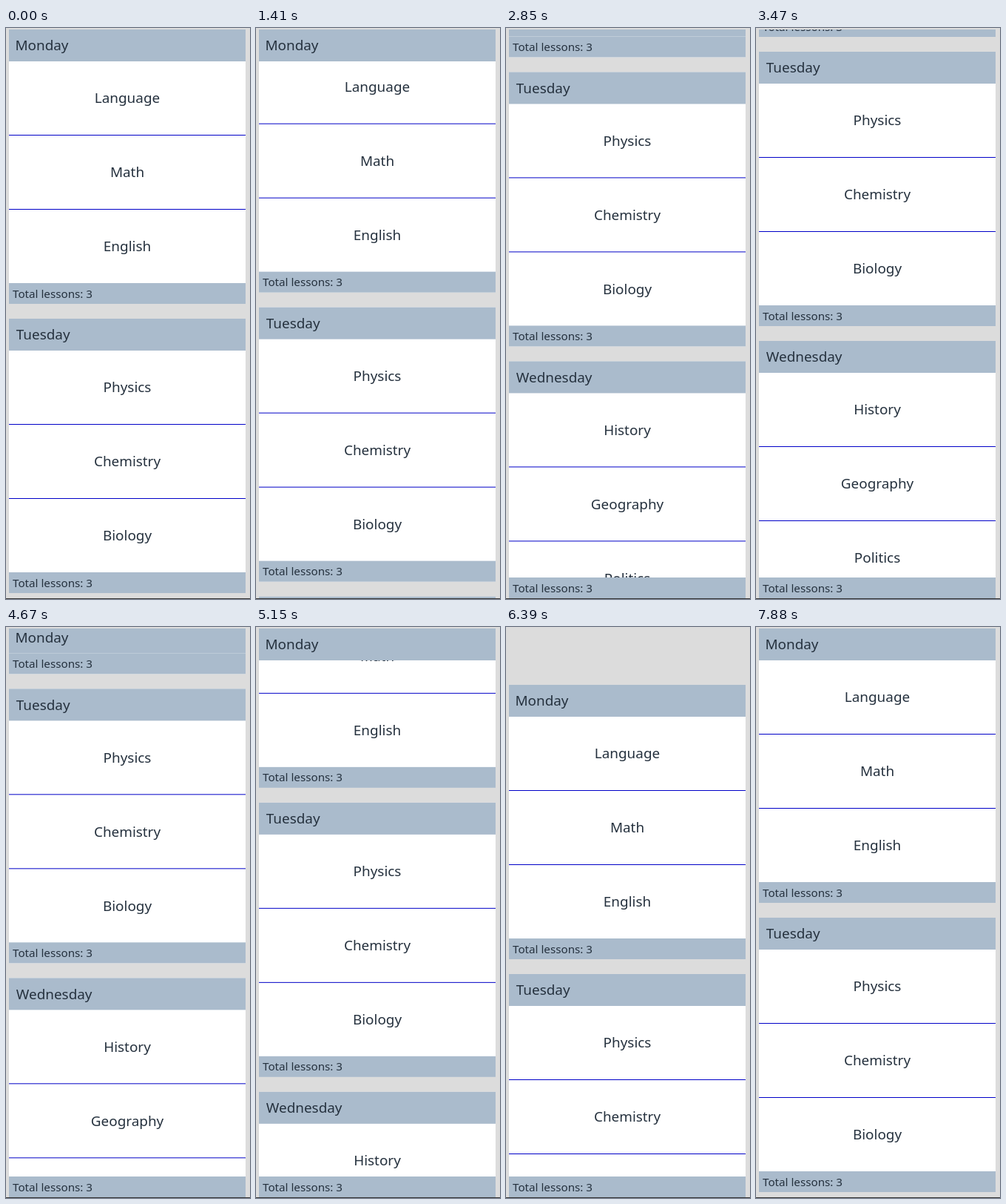
Recreate the animation shown at these times as an HTML page with a canvas. Size 330x770 px, loop 9.35 s.

```html
<!DOCTYPE html>
<html lang="en">
<head>
<meta charset="utf-8">
<title>Timetable</title>
<style>
  html, body { margin: 0; width: 100%; height: 100%; overflow: hidden; background: #dcdcdc; }
  canvas { display: block; }
</style>
</head>
<body>
<canvas id="stage" width="330" height="770"></canvas>
<script>
const ctx = document.getElementById('stage').getContext('2d');
const LOOP = 9350;
const LEFT = 4, WIDTH = 320, TOP = 2, BOTTOM = 769;
const HEADER = 43, ROW = 100, FOOTER = 28, HEIGHT = 370, PITCH = 390;
const BAR = '#aabbcc', INK = '#25313e';

const days = [
  ['Monday', 'Language', 'Math', 'English'],
  ['Tuesday', 'Physics', 'Chemistry', 'Biology'],
  ['Wednesday', 'History', 'Geography', 'Politics']
];

// Scroll keys: time (ms), offset (px), speed (px/ms)
const keys = [
  [0, 0, 0], [1255, 0, 0],
  [2090, 229.6, .24], [2850, 332.5, .075], [3200, 354, .04], [3470, 360, 0],
  [4315, 360, 0], [4670, 308.9, -.24], [5640, 32.6, -.1], [5760, 31, -.02],
  [6180, -63, -.12], [6390, -76, 0]
];
const RELEASE = 7315, REST = 7880, STIFFNESS = .015;

function scrollAt(t) {
  if (t >= REST) return 0;
  if (t >= RELEASE) {
    // Critically damped spring back from the overscroll
    const x = STIFFNESS * (t - RELEASE);
    return -76 * (1 + x) * Math.exp(-x);
  }
  const i = keys.findIndex(k => k[0] > t);
  if (i < 0) return -76;
  const [t0, y0, v0] = keys[i - 1], [t1, y1, v1] = keys[i];
  const d = t1 - t0, u = (t - t0) / d, w = 1 - u;
  return w * w * ((1 + 2 * u) * y0 + u * d * v0) + u * u * ((1 + 2 * w) * y1 - w * d * v1);
}

function box(color, y, h) {
  ctx.fillStyle = color;
  ctx.fillRect(LEFT, y, WIDTH, h);
}

function label(text, x, y, size, align = 'left') {
  ctx.font = `${size}px "Noto Sans", "Open Sans", sans-serif`;
  ctx.textAlign = align;
  ctx.fillStyle = INK;
  ctx.fillText(text, x, y);
}

function drawDay([name, ...lessons], top) {
  if (top > BOTTOM || top + HEIGHT < TOP) return;
  box('#fff', top, HEIGHT);
  lessons.forEach((lesson, i) => {
    label(lesson, 164, top + 99.3 + i * ROW, 18.9, 'center');
    if (i) box('#0000c8', top + 42 + i * ROW, 1);
  });

  // Bars stick to the viewport edges but stay inside their section
  const end = top + HEIGHT - FOOTER;
  const footerY = Math.max(Math.min(end, BOTTOM - FOOTER), top + HEADER);
  const headerY = Math.min(Math.max(top, TOP), end - HEADER);
  box(BAR, footerY, FOOTER);
  label('Total lessons: ' + lessons.length, 9, footerY + 19.5, 15.2);
  box(BAR, headerY, HEADER);
  label(name, name[0] === 'M' ? 12.4 : 13.8, headerY + 28.4, 18.9);
}

function draw(t) {
  const scroll = scrollAt(t);
  ctx.fillStyle = '#dcdcdc';
  ctx.fillRect(0, 0, 330, 770);
  ctx.save();
  ctx.beginPath();
  ctx.rect(0, TOP, 330, BOTTOM - TOP);
  ctx.clip();
  days.forEach((day, i) => drawDay(day, TOP + i * PITCH - scroll));
  ctx.restore();
  ctx.fillStyle = '#333';
  ctx.fillRect(0, BOTTOM, 330, 1);
}

const start = performance.now();
function tick() {
  draw((performance.now() - start) % LOOP);
  requestAnimationFrame(tick);
}
tick();
</script>
</body>
</html>
```
